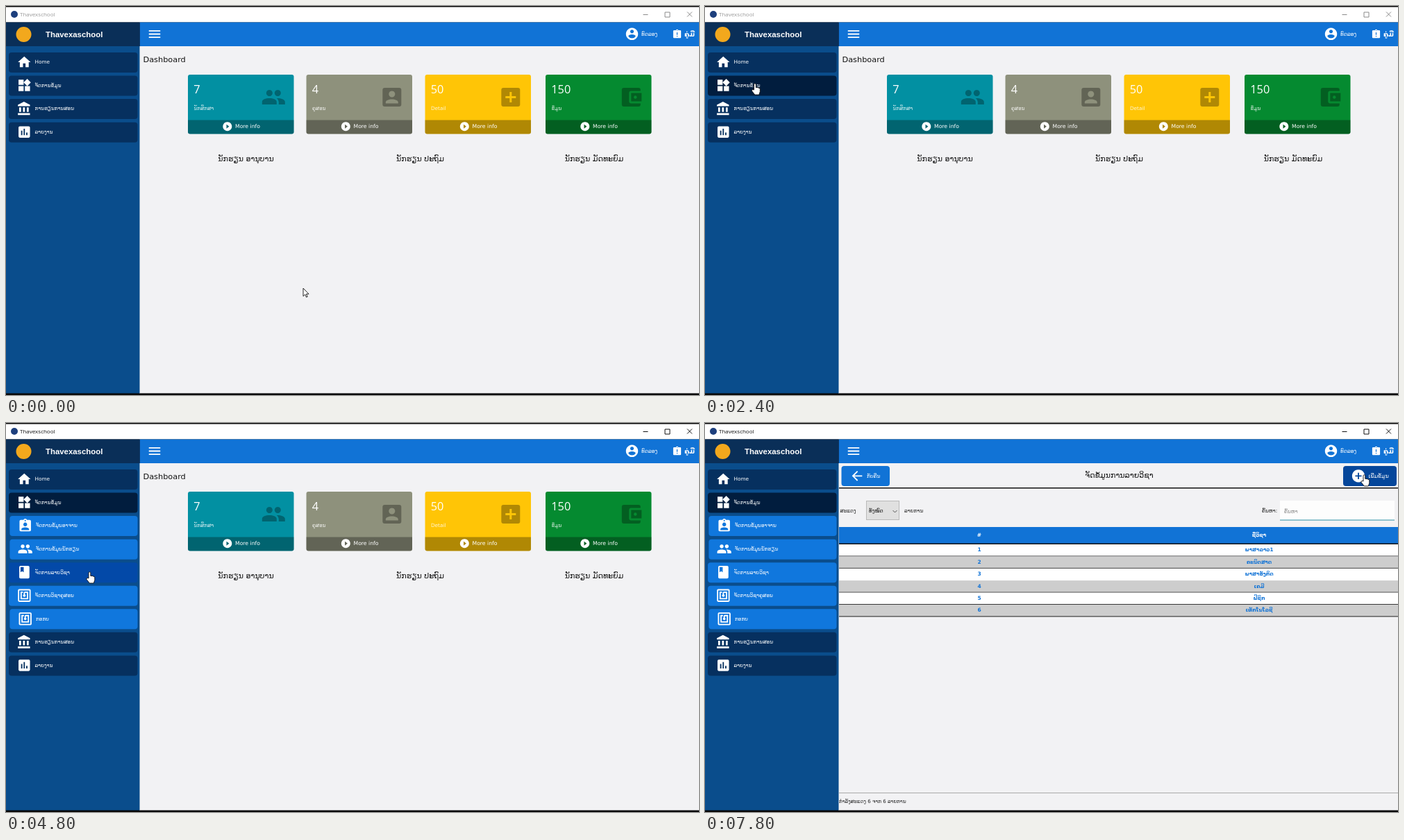
An HTML page that plays this animation: 998 px wide and 561 px high, repeating every 8 s.

```html
<!DOCTYPE html>
<html lang="lo">
<head>
<meta charset="utf-8">
<title>School dashboard</title>
<style>
  html, body { margin: 0; width: 100%; height: 100%; overflow: hidden; background: #000; }
  svg { display: block; width: 100%; height: 100%; }
  text { font-family: "DejaVu Sans", sans-serif; white-space: pre; }
  .ui { font-family: "Open Sans", sans-serif; }
  .brand { font-family: "Liberation Sans", Arial, sans-serif; }
</style>
</head>
<body>
<svg id="stage" viewBox="0 0 998 561" preserveAspectRatio="none"></svg>
<script>
const LOOP = 8000, STEP = 200, CLICK_MENU = 2600, CLICK_SUBJECTS = 5000;
const BLUE = '#1173d6', NAVY = '#06305f', PRESSED = '#011d3e', SUB_HOVER = '#0349a8';
const SMALL = 7.3, HEADING = 11;

// Icons on a 24 unit grid, filled with the even-odd rule
const dot = (x, y, r) => `M${x} ${y - r}a${r} ${r} 0 1 0 .01 0z`;
const BOX = 'M5 3h14q2 0 2 2v14q0 2-2 2H5q-2 0-2-2V5q0-2 2-2z';
const CLIPBOARD = 'M5 3h4.2a3 3 0 0 1 5.6 0H19q2 0 2 2v14q0 2-2 2H5q-2 0-2-2V5q0-2 2-2z' + dot(12, 4, 1);
const PLUS = 'M11 7h2v4h4v2h-4v4h-2v-4H7v-2h4z';
const ICONS = {
  home: 'M10 20v-6h4v6h5v-8h3L12 3 2 12h3v8z',
  widgets: 'M13 13h8v8h-8zM3 13h8v8H3zM3 3h8v8H3zM16.7 1.7l5.6 5.6-5.6 5.7L11 7.3z',
  bank: 'M4 10h3v7H4zM10 10h3v7h-3zM16 10h3v7h-3zM2 19h19v3H2zM11.5 1L2 6v2h19V6z',
  chart: BOX + 'M7 10h2v7H7zM11 7h2v10h-2zM15 13h2v4h-2z',
  people: dot(8, 8, 3) + dot(16, 8, 3) +
    'M1 19v-2.5c0-4.7 14-4.7 14 0V19zM17 19v-2.5q0-2-2-3.45c3-.3 8 .9 8 3.45V19z',
  teacher: CLIPBOARD + dot(12, 10, 3) + 'M6 19v-1.4c0-4.1 12-4.1 12 0V19z',
  notice: CLIPBOARD + 'M11 8h2v6h-2zM11 16h2v2h-2z',
  book: 'M6 2h12q2 0 2 2v16q0 2-2 2H6q-2 0-2-2V4q0-2 2-2zM6 4v8l2.5-1.5L11 12V4z',
  tag: 'M4 2h16q2 0 2 2v16q0 2-2 2H4q-2 0-2-2V4q0-2 2-2zM4 4v16h16V4z' +
    'M18 6h-5q-2 0-2 2v2.3a2 2 0 1 0 2 0V8h3v8H8V8h2V6H6v12h12z',
  portrait: BOX + dot(12, 9, 3) + 'M6 18v-1c0-4.1 12-4.1 12 0v1z',
  addBox: BOX + PLUS,
  wallet: 'M21 18v1q0 2-2 2H5q-2 0-2-2V5q0-2 2-2h14q2 0 2 2v1h-9q-2 0-2 2v8q0 2 2 2zM12 8h10v8H12z' + dot(16, 12, 1.5),
  user: dot(12, 12, 10) + dot(12, 8, 3) + 'M6 16c0-4.1 12-4.1 12 0q-2 3.2-6 3.2T6 16z',
  play: dot(12, 12, 10) + 'M10 7.5v9l6-4.5z',
  add: dot(12, 12, 10) + PLUS,
  back: 'M20 11H7.8l5.6-5.6L12 4l-8 8 8 8 1.4-1.4L7.8 13H20z',
  menu: 'M3 6h18v2H3zM3 11h18v2H3zM3 16h18v2H3z'
};

const rect = (x, y, w, h, fill, r = 0, extra = '') =>
  `<rect x="${x}" y="${y}" width="${w}" height="${h}" rx="${r}" fill="${fill}" ${extra}/>`;
const text = (s, x, y, size, fill = '#fff', extra = '') =>
  `<text x="${x}" y="${y}" font-size="${size}" fill="${fill}" ${extra}>${s}</text>`;
const middle = (s, x, y, size, fill, extra = '') => text(s, x, y, size, fill, 'text-anchor="middle" ' + extra);
const icon = (name, cx, cy, size, fill = '#fff') =>
  `<path d="${ICONS[name]}" fill="${fill}" fill-rule="evenodd" transform="translate(${cx - size / 2} ${cy - size / 2}) scale(${size / 24})"/>`;
const stroke = (d, color, width = 1) => `<path d="${d}" fill="none" stroke="${color}" stroke-width="${width}"/>`;

const MAIN_MENU = [
  ['home', 'Home'], ['widgets', 'ຈັດການຂໍ້ມູນ'], ['bank', 'ການຮຽນການສອນ'], ['chart', 'ລາຍງານ']
];
// Submenu: icon, label, indent
const SUB_MENU = [
  ['teacher', 'ຈັດການຂໍ້ມູນອາຈານ', 1.4], ['people', 'ຈັດການຂໍ້ມູນນັກຮຽນ', 1.4],
  ['book', 'ຈັດການລາຍວິຊາ', .1], ['tag', 'ຈັດການວິຊາຄູສອນ', .1], ['tag', 'ກອກບ', 1.4]
];
const OPEN_MENU = [...MAIN_MENU.slice(0, 2), ...SUB_MENU, ...MAIN_MENU.slice(2)];

const CARDS = [
  [262, '7', 'ນັກສຶກສາ', '#0290a2', 'people'],
  [432.5, '4', 'ຄູສອນ', '#8e917c', 'portrait'],
  [603.5, '50', 'Detail', '#ffc506', 'addBox'],
  [777, '150', 'ຂໍ້ມູນ', '#058a30', 'wallet']
];
const SUBJECTS = ['ພາສາລາວ1', 'ຄະນິດສາດ', 'ພາສາອັງກິດ', 'ເຄມີ', 'ຟີຊິກ', 'ເທັກໂນໂລຊີ'];

// Pointer stops: time, x, y
const POINTER = [
  [0, 428, 407], [200, 428, 407], [1200, 79, 149], [1400, 79, 149], [2000, 72, 112],
  [2600, 72, 112], [3200, 88.5, 213], [3800, 88.5, 213], [4400, 120.5, 215],
  [5200, 120.5, 215], [6200, 946.5, 144], [6400, 946.5, 144], [7000, 949.5, 75], [8000, 949.5, 75]
];

function pointerAt(t) {
  const i = POINTER.findIndex((p, k) => k && t <= p[0]);
  const [t0, x0, y0] = POINTER[i - 1], [t1, x1, y1] = POINTER[i];
  const u = (t - t0) / (t1 - t0), e = u * u * (3 - 2 * u);
  return { x: x0 + (x1 - x0) * e, y: y0 + (y1 - y0) * e };
}

const inside = (p, x, y, w, h) => p.x >= x && p.x <= x + w && p.y >= y && p.y <= y + h;

function titleBar(active) {
  const ink = active ? '#111' : '#8a8a8a';
  return rect(0, 1.5, 998, 22, '#fff') + '<circle cx="12" cy="12" r="5" fill="#1d3f7d"/>' +
    text('Thavexschool', 20, 15.3, 8, active ? '#111' : '#999', 'class="ui"') +
    stroke('M917.5 12.5h7M949 9h7v7h-7zM981 8.5l7 7m0-7l-7 7', ink);
}

function topBar() {
  return rect(192.5, 23.5, 805.5, 34.5, BLUE) + rect(0, 23.5, 192.5, 34.5, '#0a2f58') +
    '<circle cx="25.5" cy="41" r="11" fill="#f2a81d"/>' +
    text('Thavexaschool', 57, 44.5, 11.4, '#fff', 'class="brand" font-weight="bold"') +
    icon('menu', 214, 40.5, 22) + icon('user', 901.5, 40.3, 21) + text('ທົດລອງ', 915, 43, 7.5) +
    icon('notice', 966.5, 40.5, 15) + text('ຄູ່ມື', 977, 44, 9.5, '#fff', 'font-weight="bold"');
}

function sidebar(items, pointer, menuOpen) {
  let out = rect(0, 58, 192.5, 500.5, '#0a4d8c'), hovering = false;
  items.forEach(([glyph, label, indent = 0], i) => {
    const x = 4 + indent, y = 67 + 33.55 * i;
    const hover = inside(pointer, x, y, 185, 29);
    hovering ||= hover;
    const dark = hover || (menuOpen && i === 1);
    const fill = indent ? (hover ? SUB_HOVER : '#1077dd') : (dark ? PRESSED : NAVY);
    out += rect(x, y, 189.5 - x, 29, fill, 4) +
      icon(glyph, x + 22.3, y + 14, 22) + text(label, x + 37.5, y + 16.3, SMALL);
  });
  return { out, hovering };
}

function dashboard() {
  let out = text('Dashboard', 197.5, 81, 11.3, '#111');
  for (const [x, count, label, color, glyph] of CARDS) {
    out += rect(x, 99, 152.5, 85.5, color, 3) +
      `<path d="M${x} 164.5h152.5v17q0 3-3 3h-146.5q-3 0-3-3z" fill="#000" fill-opacity=".31"/>` +
      text(count, x + 8.3, 125.8, 16.3, '#fff', 'class="ui"') +
      text(label, x + 8.5, 149.5, SMALL, '#fff', 'fill-opacity=".85"') +
      icon(glyph, x + 123.3, 131.5, 36, 'rgba(0,0,0,.31)') +
      icon('play', x + 56.8, 173.7, 15.6) + text('More info', x + 68, 176.3, 7.7);
  }
  return out + middle('ນັກຮຽນ ອານຸບານ', 345.5, 224, HEADING, '#111') +
    middle('ນັກຮຽນ ປະຖົມ', 596.5, 224, HEADING, '#111') + middle('ນັກຮຽນ ມັດທະຍົມ', 847, 224, HEADING, '#111');
}

function subjectsPage(addHover) {
  let out = rect(196.5, 62, 69.5, 29, BLUE, 4) + icon('back', 219, 76.3, 22) + text('ກັບຄືນ', 233, 79, SMALL) +
    middle('ຈັດຂໍ້ມູນການລາຍວິຊາ', 596.5, 79, HEADING, '#111') +
    rect(919, 62, 77, 29, addHover ? '#05479b' : BLUE, 4) + icon('add', 941, 76.3, 22) + text('ເພີ່ມຂໍ້ມູນ', 955.5, 79, 7.7) +
    stroke('M193 93.8H998', '#111', 1.4) +
    text('ສະແດງ', 194.5, 129, SMALL, '#222') +
    rect(232.5, 112.5, 47, 27, '#e0e0e0', 0, 'stroke="#b9b9b9"') + text('ທັງໝົດ', 236, 129, SMALL, '#111') +
    stroke('M270.5 126l3 3 3-3', '#555') + text('ລາຍການ', 287, 129, SMALL, '#222') +
    text('ຄົ້ນຫາ:', 802, 129, SMALL, '#222') + rect(828, 112, 165, 28, '#fdfdfd') +
    stroke('M828 140H993', '#2b8fa6', 1.2) + text('ຄົ້ນຫາ', 834, 130, SMALL, '#888') +
    rect(193, 150, 805, 24, BLUE) + stroke('M193 174.3H998', '#111', 1.4);
  const bold = 'font-weight="bold"';
  out += middle('#', 395, 164, 7.5, '#fff', bold) + middle('ຊື່ວິຊາ', 798, 164, SMALL, '#fff', bold);
  SUBJECTS.forEach((name, i) => {
    const y = 175 + 17.4 * i;
    out += rect(193, y, 805, 17.4, i % 2 ? '#cdcdcd' : '#fff') +
      (i === 2 ? '' : stroke(`M193 ${y + 17}H998`, '#222')) +
      middle(i + 1, 395, y + 10.4, 7.5, BLUE, bold) + middle(name, 798, y + 10.4, 7.2, BLUE, bold);
  });
  return out + stroke('M193 533.5H998', '#aaa') + text('ກຳລັງສະແດງ 6 ຈາກ 6 ລາຍການ', 193, 547.7, 7.1, '#222');
}

function cursor({ x, y }, hand) {
  const d = hand
    ? 'M-1.5 9V1.2a1.4 1.4 0 0 1 2.8 0V5.5q3-.5 6 1.5v4.5l-1.5 4.5h-6L-4.5 10.5q-.5-2 1.5-2z'
    : 'M0 0v11.5l2.7-2.5 1.8 4 1.7-.8-1.8-3.9H8z';
  return `<path d="${d}" transform="translate(${x} ${y})" fill="#fff" stroke="#111" stroke-width=".9" stroke-linejoin="round"/>`;
}

function render(t) {
  const pointer = pointerAt(t), menuOpen = t >= CLICK_MENU, onSubjects = t >= CLICK_SUBJECTS;
  const menu = sidebar(menuOpen ? OPEN_MENU : MAIN_MENU, pointer, menuOpen);
  const addHover = onSubjects && inside(pointer, 919, 62, 77, 29);
  return rect(0, 0, 998, 561, '#080808') + rect(192, 58, 806, 500.5, '#f2f2f4') +
    titleBar(menuOpen) + topBar() + menu.out +
    (onSubjects ? subjectsPage(addHover) : dashboard()) +
    cursor(pointer, menu.hovering || addHover);
}

const stage = document.getElementById('stage');
const start = performance.now();
let shown = -1;
function tick() {
  const t = Math.floor((performance.now() - start) % LOOP / STEP) * STEP;
  if (t !== shown) stage.innerHTML = render(shown = t);
  requestAnimationFrame(tick);
}
tick();
</script>
</body>
</html>
```
